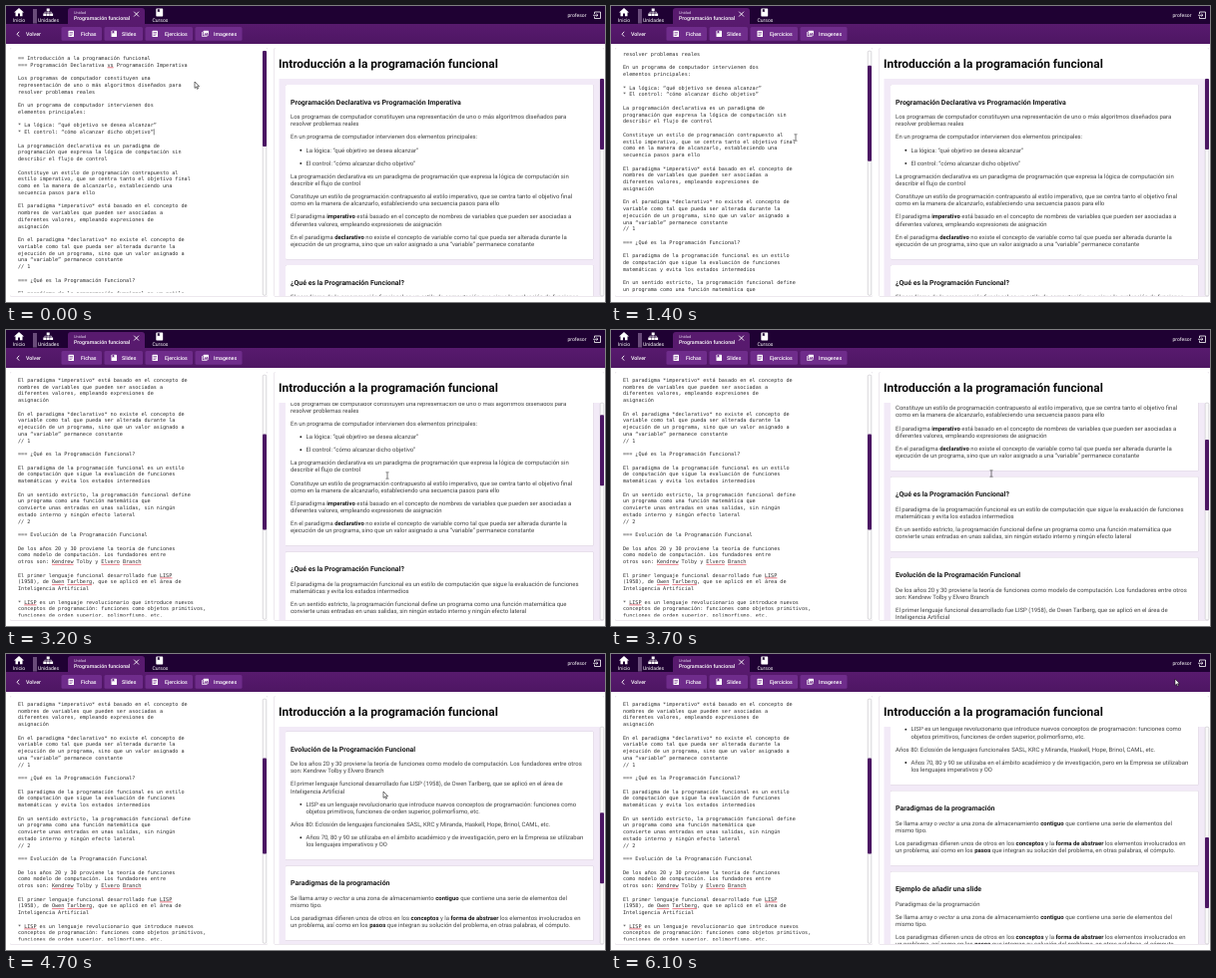
An HTML page that plays this animation: 600 px wide and 297 px high, repeating every 6.2 s.

```html
<!DOCTYPE html>
<html lang="es">
<head>
<meta charset="utf-8">
<title>Editor de unidades</title>
<style>
html, body { margin: 0; width: 100%; height: 100%; overflow: hidden; background: #fff; }
svg { display: block; width: 100%; height: 100%; }
text { font-family: Roboto, sans-serif; font-size: 5.97px; fill: #424242; text-rendering: geometricPrecision; white-space: pre; }
.mono text { font-family: "DejaVu Sans Mono", monospace; font-size: 5.13px; fill: #2c2c2c; }
.b { font-weight: 700; fill: #1c1c1c; }
.i { font-style: italic; }
.h1 { font-size: 11.93px; font-weight: 700; fill: #0c0c0c; }
.h3 { font-size: 6.98px; font-weight: 700; fill: #1c1c1c; }
.nav { font-size: 5.05px; fill: #fff; }
.btn { font-size: 5.25px; font-weight: 500; fill: #fff; }
.tiny { font-size: 3.9px; fill: #e5d6ee; }
.card { fill: #fff; filter: drop-shadow(0 .6px .7px rgba(60, 15, 80, .38)); }
.track { fill: #fafafa; stroke: #b9b4bd; stroke-width: .5; }
.thumb { fill: #4b1563; }
</style>
</head>
<body>
<svg id="stage" viewBox="0 0 600 297" preserveAspectRatio="none">
  <defs>
    <clipPath id="clipL"><rect x="5" y="45" width="251" height="242.5"/></clipPath>
    <clipPath id="clipR"><rect x="273" y="73" width="322" height="218"/></clipPath>
    <linearGradient id="bar" x2="0" y2="1">
      <stop offset="0" stop-color="#581a6e"/><stop offset="1" stop-color="#4e1663"/>
    </linearGradient>
    <linearGradient id="edge">
      <stop offset="0" stop-color="#8d6f9c"/><stop offset="1" stop-color="#1f0133" stop-opacity="0"/>
    </linearGradient>
  </defs>
  <rect width="600" height="297" fill="#fff"/>
  <rect class="card" x="4" y="42" width="258" height="249.5" rx="1.5"/>
  <rect class="card" x="268.5" y="42" width="330.5" height="249.5" rx="1.5"/>

  <g id="top">
    <rect width="600" height="18.5" fill="#1f0133"/>
    <rect y="18" width="600" height="20" fill="url(#bar)"/>
    <path d="M62 18.5V5q0-3 3-3h71q3 0 3 3v13.5z" fill="#581a6e"/>
    <path d="M27 3h4v14.500h-4zM144.500 3h4v14.500h-4z" fill="url(#edge)" opacity=".7"/>
    <g fill="#fff">
      <path d="M13 2l-5 4.6h1.5V10.3h2.5V7.5h2v2.8h2.5V6.6H18z"/>
      <path d="M40.7 2.5h3v2.6h-3zM37.3 7.4h3v2.6h-3zM40.7 7.4h3v2.6h-3zM44.1 7.4h3v2.6h-3z"/>
      <path d="M38.8 7.4V6.2h6.8v1.2M42.2 5v2.4" fill="none" stroke="#fff" stroke-width=".6"/>
      <path d="M151 2.5h5.5q.7 0 .7.7v6.6q0 .7-.7.7H151q-.7 0-.7-.7V3.2q0-.7.7-.7zM151.8 3.2v3l1-.7 1 .7v-3z" fill-rule="evenodd"/>
    </g>
    <path d="M128.2 5.700l4.800 4.800M133 5.700l-4.800 4.800" stroke="#fff" stroke-width=".9"/>
    <path d="M589.5 8V6h6v6.500h-6v-2M588 9.250h4.800M591.4 7.800l1.500 1.450-1.500 1.450" fill="none" stroke="#fff" stroke-width=".8"/>
    <path d="M13.2 25.800l-2.200 2.400 2.200 2.400" fill="none" stroke="#fff" stroke-width=".9"/>
  </g>

  <text class="h1" x="273" y="61.6">Introducción a la programación funcional</text>

  <g class="mono" clip-path="url(#clipL)"><g id="editor"></g></g>
  <rect class="track" x="257.2" y="45.2" width="3.6" height="245" rx="1.200"/>
  <rect id="thumbL" class="thumb" x="257" y="45" width="4" height="96" rx="1"/>

  <rect x="273.5" y="73" width="321.5" height="218" fill="#f2eaf7"/>
  <g clip-path="url(#clipR)"><g id="preview"></g></g>
  <rect class="track" x="595.2" y="73.2" width="3.6" height="217.6" rx="1.200"/>
  <rect id="thumbR" class="thumb" x="595" y="73" width="4" height="71" rx="1"/>

  <g id="pointer">
    <path id="arrow" d="M-1-3v6.400l1.500-1.300 1 2.200 1-.45-1-2.150h2z" fill="#fff" stroke="#111" stroke-width=".6"/>
    <path id="beam" d="M-1.5-3.200h1.200l.3.300.3-.3h1.200M0-2.900v5.800M-1.5 3.200h1.200l.3-.3.3.3h1.200" fill="none" stroke="#222" stroke-width=".6"/>
  </g>
</svg>
<script>
const NS = "http://www.w3.org/2000/svg";
const $ = id => document.getElementById(id);

function add(parent, tag, attrs, content) {
  const el = document.createElementNS(NS, tag);
  for (const k in attrs) el.setAttribute(k, attrs[k]);
  if (content) el.textContent = content;
  parent.appendChild(el);
  return el;
}

// *bold* and _italic_ runs
function rich(parent, x, y, line) {
  const el = add(parent, "text", { x, y });
  for (const run of line.split(/(\*[^*]+\*|_[^_]+_)/)) {
    if (!run) continue;
    const mark = run[0];
    if (mark === "*" || mark === "_")
      add(el, "tspan", { class: mark === "*" ? "b" : "i" }, run.slice(1, -1));
    else el.appendChild(document.createTextNode(run));
  }
}

// Header labels
const header = $("top");
[["Inicio", 7, 16, "nav"], ["Unidades", 32, 16, "nav"], ["Cursos", 146.5, 16, "nav"],
 ["profesor", 562.5, 11, "nav"], ["Unidad", 68, 8.2, "tiny"],
 ["Programación funcional", 68, 13.8, "btn"], ["Volver", 20, 30, "btn"]]
  .forEach(([s, x, y, c]) => add(header, "text", { x, y, class: c }, s));

const BTN = "#6f2c8b";
[["Fichas", 55.5, 40.5, 75], ["Slides", 98.5, 38.5, 116],
 ["Ejercicios", 139.5, 47.5, 159], ["Imagenes", 189.5, 47, 208]]
  .forEach(([s, x, w, tx], n) => {
    add(header, "rect", { x, y: 21, width: w, height: 13.8, rx: 1.5, fill: BTN });
    const ix = x + 7, g = add(header, "g", { fill: "#fff" });
    if (n === 3) {
      add(g, "path", { d: `M${ix} 26v4.5h5`, fill: "none", stroke: "#fff", "stroke-width": .7 });
      add(g, "rect", { x: ix + 1.2, y: 24.8, width: 5.3, height: 4.6, rx: .5 });
      add(g, "path", { d: `M${ix + 1.9} 28.7l1.3-1.7 1 1 1.1-1.5 1 2.2z`, fill: BTN });
    } else {
      add(g, "rect", { x: ix, y: 24.8, width: 5.5, height: 6.2, rx: .6 });
      add(g, "path", {
        d: n === 1 ? `M${ix + 1} 25v2.7l.9-.6.9.6V25z` : `M${ix + 1} 26.5h3.5M${ix + 1} 28h3.5M${ix + 1} 29.5h2.3`,
        fill: n === 1 ? BTN : "none", stroke: BTN, "stroke-width": n === 1 ? 0 : .6
      });
    }
    add(header, "text", { x: tx, y: 30, class: "btn" }, s);
  });

// Editor; ~word~ carries a spelling mark
const source = `== Introducción a la programación funcional
=== Programación Declarativa ~vs~ Programación Imperativa

Los programas de computador constituyen una
representación de uno o más algoritmos diseñados para
resolver problemas reales

En un programa de computador intervienen dos
elementos principales:

* La lógica: “qué objetivo se desea alcanzar”
* El control: “cómo alcanzar dicho objetivo”

La programación declarativa es un paradigma de
programación que expresa la lógica de computación sin
describir el flujo de control

Constituye un estilo de programación contrapuesto al
estilo imperativo, que se centra tanto el objetivo final
como en la manera de alcanzarlo, estableciendo una
secuencia pasos para ello

El paradigma *imperativo* está basado en el concepto de
nombres de variables que pueden ser asociadas a
diferentes valores, empleando expresiones de
asignación

En el paradigma *declarativo* no existe el concepto de
variable como tal que pueda ser alterada durante la
ejecución de un programa, sino que un valor asignado a
una “variable” permanece constante
// 1

=== ¿Qué es la Programación Funcional?

El paradigma de la programación funcional es un estilo
de computación que sigue la evaluación de funciones
matemáticas y evita los estados intermedios

En un sentido estricto, la programación funcional define
un programa como una función matemática que
convierte unas entradas en unas salidas, sin ningún
estado interno y ningún efecto lateral
// 2

=== Evolución de la Programación Funcional

De los años 20 y 30 proviene la teoría de funciones
como modelo de computación. Los fundadores entre
otros son: ~Kendrew~ Tolby y ~Elvero~ ~Branch~

El primer lenguaje funcional desarrollado fue ~LISP~
(1958), de ~Owen~ ~Tarlberg~, que se aplicó en el área de
Inteligencia Artificial

* ~LISP~ es un lenguaje revolucionario que introduce nuevos
conceptos de programación: funciones como objetos primitivos,
funciones de orden superior, polimorfismo, etc.`;

const CH = 3.088, ROW = 6.75, editor = $("editor");
source.split("\n").forEach((line, row) => {
  const y = 53.8 + row * ROW;
  let col = 0, plain = "";
  line.split("~").forEach((part, n) => {
    if (n % 2) add(editor, "path", {
      d: `M${12 + col * CH} ${y + 1.2}h${part.length * CH}`, stroke: "#e0283c", "stroke-width": .6
    });
    col += part.length;
    plain += part;
  });
  if (plain) add(editor, "text", { x: 12, y }, plain);
});
const caret = add(editor, "rect", { x: 12 + 44 * CH, y: 53.8 + 11 * ROW - 4.7, width: .5, height: 6, fill: "#111" });

// Preview: title first, blocks split by blank lines, "- " opens a bullet
const cards = [
`Programación Declarativa vs Programación Imperativa

Los programas de computador constituyen una representación de uno o más algoritmos diseñados para
resolver problemas reales

En un programa de computador intervienen dos elementos principales:

- La lógica: “qué objetivo se desea alcanzar”

- El control: “cómo alcanzar dicho objetivo”

La programación declarativa es un paradigma de programación que expresa la lógica de computación sin
describir el flujo de control

Constituye un estilo de programación contrapuesto al estilo imperativo, que se centra tanto el objetivo final
como en la manera de alcanzarlo, estableciendo una secuencia pasos para ello

El paradigma *imperativo* está basado en el concepto de nombres de variables que pueden ser asociadas a
diferentes valores, empleando expresiones de asignación

En el paradigma *declarativo* no existe el concepto de variable como tal que pueda ser alterada durante la
ejecución de un programa, sino que un valor asignado a una “variable” permanece constante`,
`¿Qué es la Programación Funcional?

El paradigma de la programación funcional es un estilo de computación que sigue la evaluación de funciones
matemáticas y evita los estados intermedios

En un sentido estricto, la programación funcional define un programa como una función matemática que
convierte unas entradas en unas salidas, sin ningún estado interno y ningún efecto lateral`,
`Evolución de la Programación Funcional

De los años 20 y 30 proviene la teoría de funciones como modelo de computación. Los fundadores entre otros
son: Kendrew Tolby y Elvero Branch

El primer lenguaje funcional desarrollado fue LISP (1958), de Owen Tarlberg, que se aplicó en el área de
Inteligencia Artificial

- LISP es un lenguaje revolucionario que introduce nuevos conceptos de programación: funciones como
objetos primitivos, funciones de orden superior, polimorfismo, etc.

Años 80: Eclosión de lenguajes funcionales SASL, KRC y Miranda, Haskell, Hope, Brinol, CAML, etc.

- Años 70, 80 y 90 se utilizaba en el ámbito académico y de investigación, pero en la Empresa se utilizaban
los lenguajes imperativos y OO`,
`Paradigmas de la programación

Se llama _array o vector_ a una zona de almacenamiento *contiguo* que contiene una serie de elementos del
mismo tipo.

Los paradigmas difieren unos de otros en los *conceptos* y la *forma de abstraer* los elementos involucrados en
un problema, así como en los *pasos* que integran su solución del problema, en otras palabras, el cómputo.`,
`Ejemplo de añadir una slide

Paradigmas de la programación

Se llama _array o vector_ a una zona de almacenamiento *contiguo* que contiene una serie de elementos del
mismo tipo.

Los paradigmas difieren unos de otros en los *conceptos* y la *forma de abstraer* los elementos involucrados en
un problema, así como en los *pasos* que integran su solución del problema, en otras palabras, el cómputo.`];

const preview = $("preview");
let mid = 96.6;
for (const card of cards) {
  const [title, ...blocks] = card.split("\n\n");
  const box = add(preview, "rect", { class: "card", x: 280, y: mid - 17.7, width: 308.5, rx: 1.2 });
  add(preview, "text", { class: "h3", x: 285, y: mid + 2.2 }, title);
  let y = mid + 14.6;
  for (const block of blocks) {
    const item = block.startsWith("- ");
    if (item) add(preview, "circle", { cx: 295.3, cy: y + .2, r: .95, fill: "#222" });
    for (const line of block.replace(/^- /, "").split("\n")) {
      rich(preview, item ? 300.5 : 285, y + 2, line);
      y += 7.13;
    }
    y += 6;
  }
  const last = y - 13.13;
  box.setAttribute("height", last + 15.4 - (mid - 17.7));
  mid = last + 39;
}

// Motion
const LOOP = 6200, STEP = 100, NOTCH = 37.6;
const wheelL = [1050, 1550, 1850, 2350];
const wheelR = [2950, 3300, 3550, 3850, 4170, 4310, 4450, 5050, 5350];
const path = [[0, 190, 79], [700, 186, 131], [1400, 185, 132], [2200, 183, 128], [2600, 184, 129],
  [3000, 382, 146], [3200, 382, 146], [4200, 380, 142], [4700, 379, 141], [5600, 379, 141], [6100, 566, 28]];

const smooth = p => { p = Math.min(1, Math.max(0, p)); return p * p * (3 - 2 * p); };
const scrolled = (wheel, t) => wheel.reduce((s, w) => s + NOTCH * smooth((t - w) / 150), 0);

function pointerAt(t) {
  const n = path.findIndex(p => p[0] > t);
  if (n < 0) return path[path.length - 1].slice(1);
  const [t0, x0, y0] = path[n - 1], [t1, x1, y1] = path[n];
  const k = smooth((t - t0) / (t1 - t0));
  return [x0 + (x1 - x0) * k, y0 + (y1 - y0) * k];
}

const move = (id, x, y) => $(id).setAttribute("transform", `translate(${x} ${y})`);
const show = (el, on) => el.setAttribute("visibility", on ? "visible" : "hidden");

function draw(time) {
  const t = Math.floor((time % LOOP) / STEP) * STEP;
  const left = scrolled(wheelL, t), right = scrolled(wheelR, t);
  move("editor", 0, -left);
  move("preview", 0, -right);
  move("thumbL", 0, left * .395);
  move("thumbR", 0, right * .328);
  show(caret, (t + 200) % 1060 < 530);

  const [x, y] = pointerAt(t);
  move("pointer", x, y);
  const beam = t >= 300 && t < 4300 && (x < 256 || t >= 3000);
  show($("beam"), beam);
  show($("arrow"), !beam);
}

const start = performance.now();
function tick() {
  draw(performance.now() - start);
  requestAnimationFrame(tick);
}
draw(0);
requestAnimationFrame(tick);
</script>
</body>
</html>
```
